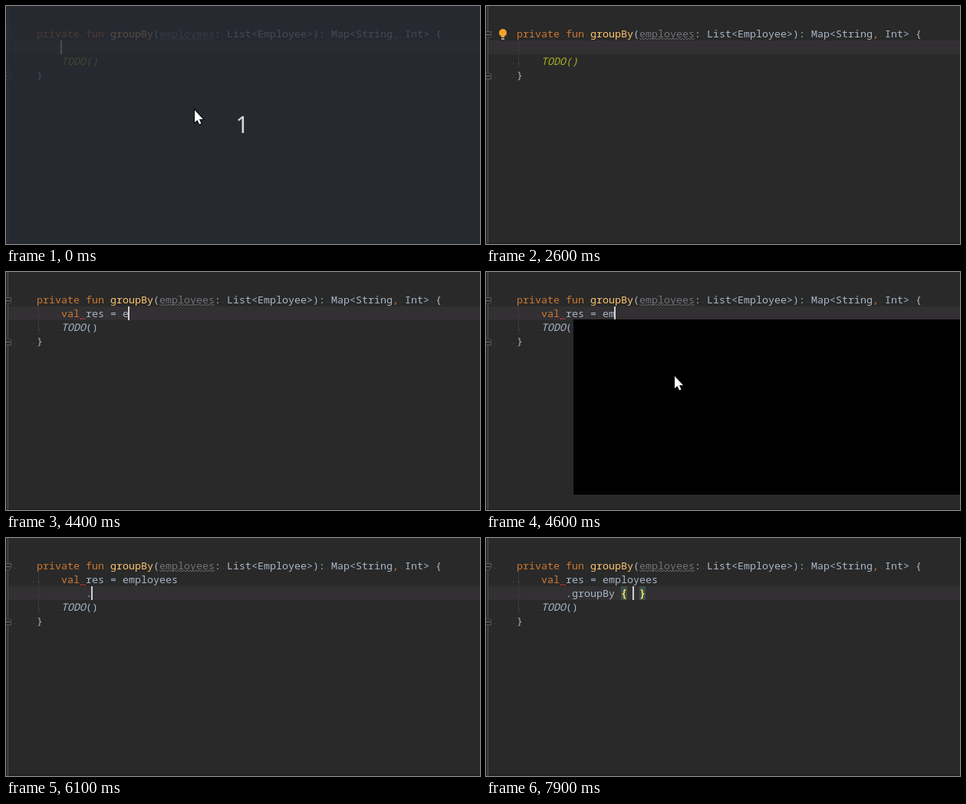
An HTML page with a canvas for the animation above (8 s loop, 618x311 px).

```html
<!DOCTYPE html>
<html lang="en">
<head>
<meta charset="utf-8">
<style>
  html, body { margin: 0; width: 100%; height: 100%; overflow: hidden; background: #292929; }
  canvas { display: block; }
</style>
</head>
<body>
<canvas id="stage" width="618" height="311"></canvas>
<script>
const ctx = document.getElementById("stage").getContext("2d");
const LOOP = 8000, COL = 8, ROW = 18;
const MONO = '13.333px "Noto Sans Mono", monospace';
const UI = '13px "Noto Sans", sans-serif';
const INK = "#a9b7c6", KEYWORD = "#cc7832", MATCH = "#b066a6", FAINT = "#777b7e";

const KLASS = "#3d87a3", METHOD = "#a86368", FIELD = "#6a5093";
// Suggestion: [icon letter, icon colour, ~matched~ name, tail, right column]
const resultList = {
  x: 66, y: 62, w: 541, h: 99, spinner: [584, 71], selectedWidth: 526,
  hint: "Press Ctrl+. to choose the selected (or first) suggestion and insert a dot afterwards",
  link: ">", linkX: 581, pi: true,
  rows: [
    ["C", KLASS, "~res~ult", ": Result<T> (brenix)", "", 1],
    ["ϟ", KLASS, "~res~ourceException", ": MissingResourceException (tolm.util)"],
    ["C", KLASS, "~res~ourceBundle", ": ResourceBundle (tolm.util)"],
    ["C", KLASS, "~re~flectionNot~S~upportedError", ": BrenixReflectionNotSupportedEr…", "", 1]
  ]
};
const emptyFunctions = ["List", "Map", "Set", "Array", "Sequence"];
const employeeList = {
  x: 114, y: 62, w: 541, h: 229,
  rows: [["p", METHOD, "~em~ployees", ": List<Employee>"],
    ...emptyFunctions.map(n => ["λ", METHOD, "~em~pty" + n, "()", ""])]
};
const hintDown = {
  hint: "Ctrl+Down and Ctrl+Up will move caret down and up in the editor", link: ">>", linkX: 489
};
const memberList = name => ({
  x: 74, y: 80, w: 541, h: 59, spinner: [606, 90], ...hintDown,
  rows: [["m", METHOD, name, "(index: Int)", "CollectionsTest.Employee"],
    ["V", FIELD, "size", "", "Int"]]
});
const groupList = match => ({
  x: 74, y: 80, w: 541, h: 119, spinner: [598, 90], ...hintDown,
  rows: ["groupBy", "groupBy", "groupByTo", "groupByTo", "groupingBy"].map(name =>
    ["λ", METHOD, name.replace(match, "~$&~"), " {...}", "Map<K, List<Employee>>"])
});
const blank = (x, y) => ({ x, y, w: 541, h: 229, black: true });

// Each step overrides part of the state from its time on.
const steps = [
  [0, { typed: "", chain: null, caret: true, dim: true, bulb: false, fresh: true, popup: null, phase: 0 }],
  [100, { dim: false, bulb: true }],
  [500, { caret: false }],
  [1000, { caret: true }],
  [1300, { caret: false }],
  [1700, { caret: true }],
  [2600, { caret: false }],
  [2900, { typed: "v", caret: true, bulb: false }],
  [3000, { typed: "va" }],
  [3100, { typed: "val" }],
  [3200, { typed: "val " }],
  [3400, { typed: "val r", fresh: false }],
  [3500, { popup: blank(66, 62) }],
  [3600, { typed: "val re", popup: resultList }],
  [3700, { typed: "val res" }],
  [3900, { typed: "val res ", popup: null }],
  [4000, { typed: "val res =" }],
  [4300, { typed: "val res = " }],
  [4400, { typed: "val res = e" }],
  [4500, { typed: "val res = em" }],
  [4600, { popup: blank(114, 62) }],
  [4700, { popup: employeeList }],
  [5100, { typed: "val res = employees", popup: null }],
  [5600, { chain: "" }],
  [6100, { chain: "." }],
  [6200, { popup: blank(74, 80) }],
  [6400, { popup: memberList("get") }],
  [6500, { chain: ".g", popup: memberList("~g~et") }],
  [6800, { phase: 1 }],
  [6900, { phase: 2 }],
  [7100, { chain: ".gr" }],
  [7200, { chain: ".gro" }],
  [7300, { chain: ".grou", popup: groupList("grou") }],
  [7400, { chain: ".group", popup: groupList("group") }],
  [7600, { phase: 3 }],
  [7700, { phase: 4 }],
  [7900, { chain: ".groupBy { ", popup: null }]
];

function stateAt(time) {
  const state = {};
  for (const [start, change] of steps) if (start <= time) Object.assign(state, change);
  return state;
}

function rect(x, y, w, h, color) {
  ctx.fillStyle = color;
  ctx.fillRect(x, y, w, h);
}

function disc(x, y, r, color) {
  ctx.fillStyle = color;
  ctx.beginPath();
  ctx.arc(x, y, r, 0, 7);
  ctx.fill();
}

function label(text, x, y, color, font, align = "left") {
  ctx.font = font;
  ctx.fillStyle = color;
  ctx.textAlign = align;
  ctx.fillText(text, x, y);
}

// Writes on the character grid and returns the end position.
function mono(text, x, baseline, color, style = "") {
  for (const char of text) {
    label(char, x, baseline, color, style + MONO);
    x += COL;
  }
  return x;
}

const rowTop = row => 27 + row * ROW;

function code(row, indent, ...parts) {
  let x = COL;
  for (const [text, color = INK, style] of [[" ".repeat(indent)], ...parts]) {
    [...text].forEach((char, i) => {
      if (char === " ") rect(x + i * COL + 3, rowTop(row) + 12, 1, 1, "#4a4a4a");
    });
    x = mono(text, x, rowTop(row) + 14, color, style);
  }
  return x;
}

function squiggle(x, end, y, color) {
  ctx.strokeStyle = color;
  ctx.lineWidth = 1;
  ctx.beginPath();
  for (let i = 0; x + i <= end; i += 2) ctx.lineTo(x + i, y + (i % 4 ? 2 : 0));
  ctx.stroke();
}

function foldMark(y, up) {
  ctx.beginPath();
  const s = up ? -1 : 1;
  [[-2, -4], [6.5, -4], [6.5, 2], [2.5, 5], [-2, 2]].forEach(([x, dy]) => ctx.lineTo(x, y + s * dy));
  ctx.closePath();
  ctx.fillStyle = "#292929";
  ctx.fill();
  ctx.strokeStyle = "#5a5a5a";
  ctx.lineWidth = 1;
  ctx.stroke();
  rect(0, y - 0.5, 5, 1, "#777");
}

function drawEditor(s) {
  rect(0, 0, 618, 311, "#292929");
  const chained = s.chain !== null;
  const last = chained ? 4 : 3;
  rect(3, rowTop(chained ? 2 : 1), 615, ROW, "#323032");
  rect(0, 309, 618, 2, "#251f21");
  rect(2, 0, 1, 311, "#555");
  rect(42, 45, 1, rowTop(last) - 45, "#3a3a3a");
  foldMark(37.5, false);
  foldMark(rowTop(last) + 10.5, true);

  code(0, 4, ["private fun ", KEYWORD], ["groupBy", "#ffc66d"], ["("], ["employees", "#72737a"],
    [": List<Employee>): Map<String"], [",", KEYWORD], [" Int> {"]);
  squiggle(200, 272, 42, "#696969");

  const complete = s.typed.startsWith("val");
  let caretX = code(1, 8, [complete ? "val" : s.typed, complete ? KEYWORD : INK],
    [complete ? s.typed.slice(3) : ""]);
  if (!s.fresh) squiggle(96, 104, 60, "#bc3f3c");
  if (chained) {
    const [call, brace] = s.chain.split("{");
    caretX = code(2, 12, [call]);
    if (brace) {
      for (const [char, x] of [["{", 176], ["}", 200]]) {
        rect(x, 63, COL, ROW, "#3b514d");
        mono(char, x, 77, "#ffdf5a", "bold ");
      }
      caretX = 192;
    }
  }
  const todo = s.fresh ? "#a8b023" : INK;
  code(last - 1, 8, ["TODO", todo, "italic "], ["()", todo, s.fresh ? "italic " : ""]);
  code(last, 4, ["}"]);

  if (s.caret) rect(caretX - 1, rowTop(chained ? 2 : 1), 2, ROW, "#d0d0d0");
  if (s.bulb) {
    disc(22, 35, 5, "#f2a52e");
    rect(20, 39, 4, 2, "#f2a52e");
    rect(20, 42, 4, 2, "#a5a5a5");
  }
}

function drawSpinner([x, y], phase) {
  ctx.lineWidth = 1.5;
  for (let i = 0; i < 8; i++) {
    const angle = i * Math.PI / 4, dx = Math.cos(angle), dy = Math.sin(angle);
    ctx.strokeStyle = `rgba(165,168,170,${0.3 + ((i - phase + 8) % 8) * 0.08})`;
    ctx.beginPath();
    ctx.moveTo(x + dx * 3, y + dy * 3);
    ctx.lineTo(x + dx * 6.5, y + dy * 6.5);
    ctx.stroke();
  }
}

function drawRow(p, [letter, color, name, tail, right, badge], y) {
  const x = p.x + 11;
  if (letter === "V") rect(x - 6, y - 6, 13, 13, color);
  else disc(x, y, 7, color);
  label(letter, x, y + 4, "#2d3032", 'bold 10px "Noto Sans", "DejaVu Sans", sans-serif', "center");
  if (badge) rect(x + 2, y + 2, 5, 5, "#b7794f");
  if (letter !== "V") {
    rect(x + 14, y, 6, 4, "#4c8049");
    ctx.strokeStyle = "#4c8049";
    ctx.lineWidth = 1;
    ctx.strokeRect(x + 11.5, y - 3.5, 3, 4);
  }
  let end = p.x + 37;
  name.split("~").forEach((part, i) => {
    end = mono(part, end, y + 5, i % 2 ? MATCH : "#94989b", letter === "m" ? "bold " : "");
  });
  mono(tail, end, y + 5, FAINT);
  if (right) mono(right, p.x + 533 - right.length * COL, y + 5, FAINT);
}

function drawPopup(p, phase) {
  if (p.black) return rect(p.x, p.y, p.w, p.h, "#000");
  const bottom = p.y + p.h;
  rect(p.x, p.y, p.w, p.h, "#55585a");
  rect(p.x + 1, p.y + 1, p.w - 2, p.h - 2, "#3e4143");
  rect(p.x + 1, p.y + 1, (p.selectedWidth || p.w - 1) - 1, 20, "#4a4d4f");
  p.rows.forEach((row, i) => drawRow(p, row, p.y + 11 + i * 20));
  if (p.hint) {
    rect(p.x + 1, bottom - 18, p.w - 2, 17, "#44484a");
    label(p.hint, p.x + 6, bottom - 5, "#8d9092", UI);
    label(p.link, p.linkX, bottom - 5, "#589df6", UI);
    rect(p.linkX, bottom - 3, p.link.length * 10, 1, "#589df6");
  }
  if (p.pi) label("π", 595, bottom - 5, "#c8c8c8", UI);
  if (p.spinner) drawSpinner(p.spinner, phase);
}

function drawPointer() {
  ctx.beginPath();
  [[246, 136], [246, 152], [249.5, 149], [252, 154.5], [254.5, 153.5], [252, 148], [257, 148]]
    .forEach(point => ctx.lineTo(...point));
  ctx.closePath();
  ctx.lineWidth = 2;
  ctx.strokeStyle = "#000";
  ctx.stroke();
  ctx.fillStyle = "#fff";
  ctx.fill();
}

function draw(now) {
  const s = stateAt(now % LOOP);
  drawEditor(s);
  if (s.popup) drawPopup(s.popup, s.phase);
  if (s.dim) {
    rect(0, 0, 618, 311, "rgba(39,42,52,.78)");
    label("1", 308, 166, "#d6d8dc", '30px "Noto Sans", sans-serif', "center");
  }
  if (s.popup || s.dim) drawPointer();
  requestAnimationFrame(draw);
}
requestAnimationFrame(draw);
</script>
</body>
</html>
```
